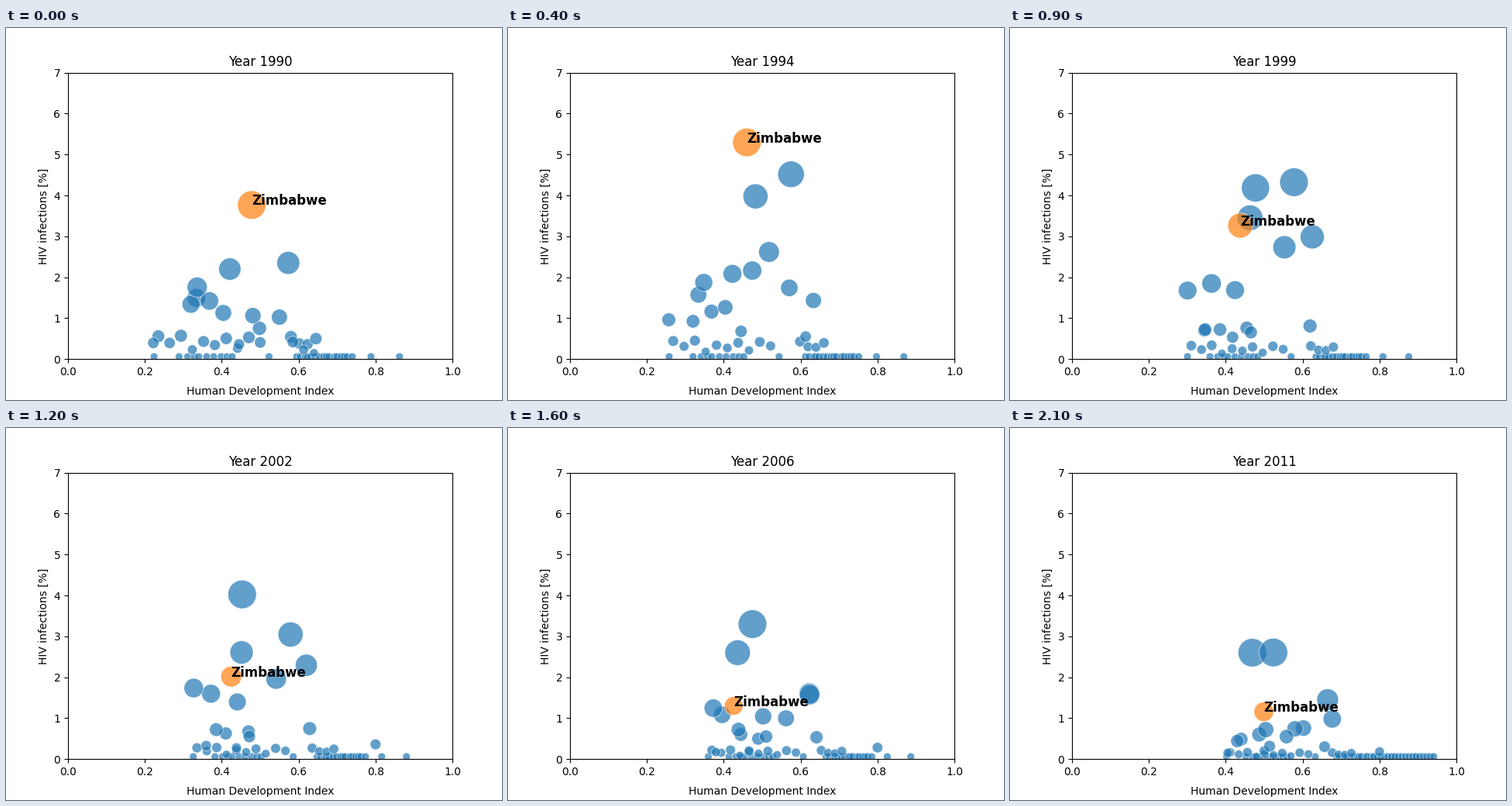
A matplotlib script that plays this animation: 640x480 px, repeating every 2.2 s.

```python
import numpy as np
import matplotlib.pyplot as plt
from matplotlib.animation import FuncAnimation

FIRST, LAST = 1990, 2011
FLOOR = 0.06             # lowest reported infection rate
SIZES = 50, 700          # marker areas, rescaled every year


def index(year, start, low, turn, end):
    """Development index: straight to the turn, then straight to the end."""
    return np.interp(year, (FIRST, turn, LAST), (start, low, end))


def wave(year, peak, top, rise, fall, tail):
    """Infection rate: bell-shaped rise to the top year, slower fall to a tail."""
    if year < top:
        return peak * np.exp(-((year - top) / rise) ** 2)
    return tail + (peak - tail) * np.exp(-((year - top) / fall) ** 2)


# Strong epidemics: arguments of index() and wave().
ZIMBABWE = (.478, .411, 2005, .499), (5.35, 1993.2, 5.4, 7, 1.15)
STRONG = [
    ((.573, .579, 2002, .677), (4.90, 1996, 7, 7.6, .90)),
    ((.498, .436, 2006, .469), (5.40, 1996.6, 4.7, 2.2, 2.60)),
    ((.550, .445, 2003, .524), (4.20, 1999.5, 8, 7.8, 2.40)),
    ((.640, .615, 2005, .665), (3.05, 1998, 4.6, 5, 1.45)),
    ((.585, .538, 2003, .602), (2.80, 1998, 5.8, 5.5, .75)),
    ((.421, .425, 2001, .580), (2.20, 1990, 5, 15, .50)),
    ((.336, .378, 2004, .440), (1.90, 1997, 25, 12, 0)),
    ((.222, .327, 2002, .430), (1.76, 2001, 9, 8.5, 0)),
    ((.481, .462, 2001, .558), (2.20, 1993.5, 4.1, 3.3, .55)),
]
# Milder ones: index start and end, then peak, top year, fall and tail.
MILD = [
    (.334, .405, 1.65, 1992.5, 6.5, .15),
    (.368, .487, 1.42, 1990, 6.5, .60),
    (.320, .504, 1.34, 1990, 3.8, .72),
    (.404, .500, 1.30, 1993, 5.5, .20),
    (.445, .514, .78, 1997, 11, .20),
    (.613, .657, .81, 1999, 9, .20),
]

rng = np.random.default_rng(4)
# Low rates that slowly fade.
faint_index = np.r_[np.linspace(.235, .5, 10), np.linspace(.58, .645, 4)]
faint_rate = rng.uniform(.2, .58, faint_index.size)
# Rates that stay at the floor.
floor_index = np.r_[.22, np.linspace(.29, .43, 9), .523,
                    np.linspace(.595, .738, 16), .786, .865]
floor_index += rng.uniform(-.004, .004, floor_index.size)
# Countries that report in the last year only.
late_index = np.linspace(.785, .941, 18)


def grow(start, year):
    """Every index closes about a quarter of its gap to 1."""
    return start + .23 * (1 - start) * (year - FIRST) / (LAST - FIRST)


def points(year):
    """All (index, rate) pairs of a year, Zimbabwe last."""
    pts = [(x, FLOOR) for x in grow(floor_index, year)]
    if year == LAST:
        pts += [(x, FLOOR) for x in late_index]
    if year >= 2000:
        pts.append((.8, .4 - .02 * (year - 2000)))
    fade = np.exp((FIRST - year) / 17)
    pts += zip(grow(faint_index, year), faint_rate * fade)
    for start, end, peak, top, fall, tail in MILD:
        pts.append((index(year, start, start, 1997, end),
                    wave(year, peak, top, 8, fall, tail)))
    for path, curve in STRONG + [ZIMBABWE]:
        pts.append((index(year, *path), wave(year, *curve)))
    pts = np.array(pts)
    pts[:, 1] = np.maximum(pts[:, 1], FLOOR)
    return pts


plt.rcParams["font.family"] = "DejaVu Sans"
fig, ax = plt.subplots(figsize=(6.4, 4.8), dpi=100)
ax.set(xlim=(0, 1), ylim=(0, 7), ylabel="HIV infections [%]")
ax.set_xlabel("Human Development Index", labelpad=8)
title = ax.set_title("")
dots = ax.scatter([], [], alpha=0.7, edgecolors="white",
                  linewidths=0.08 * SIZES[0] ** 0.5)
label = ax.text(0, 0, "Zimbabwe", size=12, weight="bold")


def update(frame):
    year = FIRST + frame
    pts = points(year)
    rate = pts[:, 1]
    dots.set_offsets(pts)
    dots.set_sizes(np.interp(rate, (FLOOR, rate.max()), SIZES))
    dots.set_facecolor(["C0"] * (len(pts) - 1) + ["C1"])
    label.set_position(pts[-1])
    title.set_text(f"Year {year}")
    return dots, label, title


anim = FuncAnimation(fig, update, frames=LAST - FIRST + 1, interval=100,
                     repeat=True, repeat_delay=0)
plt.show()
```
